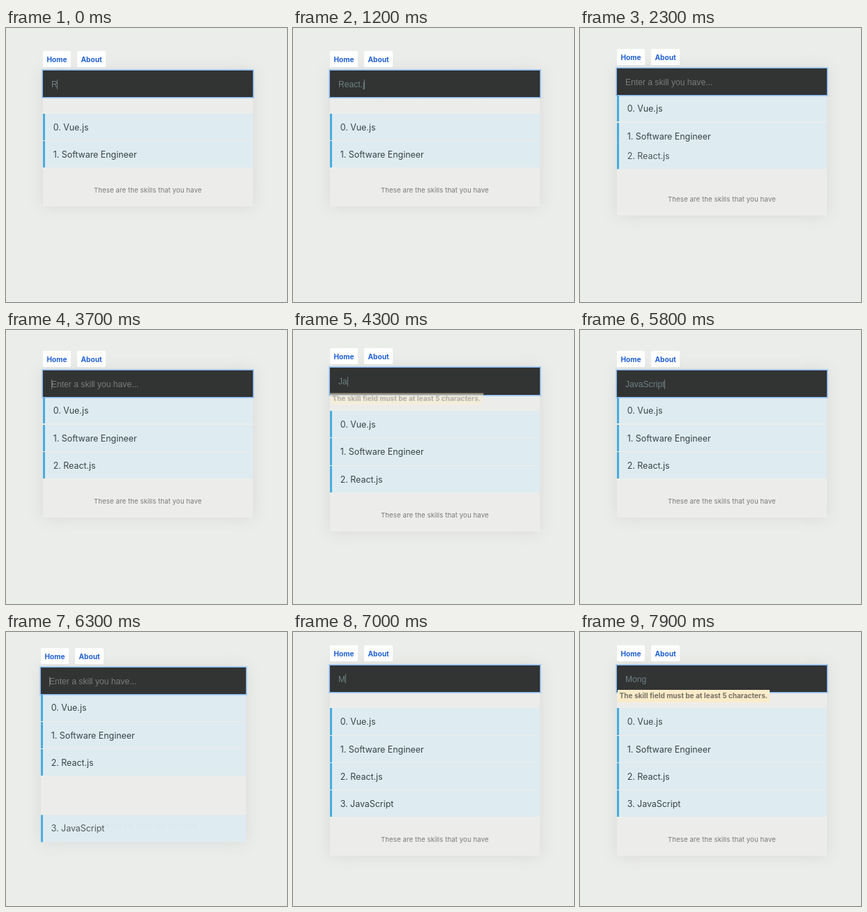
These frames come from a looping animation (403 px wide and 393 px high, 8 s). An HTML page:

```html
<!DOCTYPE html>
<html lang="en">
<head>
<meta charset="utf-8">
<title>Skills list</title>
<style>
  html, body { margin: 0; width: 100%; height: 100%; overflow: hidden; background: #ebedea; }
  body { position: relative; font-family: Inter, sans-serif; }
  body div, body span, svg { position: absolute; white-space: pre; }
  #page { top: 0; }
  .link {
    top: 0; height: 23px; line-height: 24.2px; border-radius: 1.5px; text-align: center;
    background: #fff; color: #1f5fd0; font-size: 10.1px; font-weight: 700;
  }
  #card { top: 28.3px; left: 0; width: 100%; background: #ecedeb; box-shadow: 0 0 21px #d8d9d7; }
  #field {
    top: 0; left: 0; width: 100%; height: 38.2px; z-index: 1; background: #323333;
    box-shadow: 0 0 0 1px #86b8f0, 0 0 0 2px rgba(134, 184, 240, .5);
  }
  #value { left: 11.9px; top: 0; line-height: 40.6px; font-family: "Liberation Sans", Arial, sans-serif; font-size: 12.13px; }
  #caret { top: 12.5px; width: 1px; height: 14px; background: #6c7979; }
  #alert {
    top: 35.5px; left: .5px; height: 17.5px; line-height: 17.5px; padding: 0 2.6px; z-index: 2;
    background: #faecca; color: #777064; font-size: 10.05px; font-weight: 700;
  }
  .row {
    left: 0; width: 100%; height: 38.2px; line-height: 39.6px; box-sizing: border-box;
    padding-left: 11.7px; border-left: 3px solid #46ade0;
    background: #deebf1; font-size: 12.4px;
  }
  #note { left: 0; width: 100%; line-height: 14px; text-align: center; font-size: 9.6px; letter-spacing: .1px; color: #787a78; }
  #pointer { left: 118px; top: 69px; }
</style>
</head>
<body>
<div id="page">
  <div id="card">
    <div id="note">These are the skills that you have</div>
    <div id="field"><span id="value"></span><div id="caret"></div></div>
    <div id="alert">The skill field must be at least 5 characters.</div>
  </div>
  <div class="link" style="left:0;width:40px">Home</div>
  <div class="link" style="left:49.3px;width:40.6px">About</div>
</div>
<svg id="pointer" width="13" height="21" viewBox="0 0 13 21" fill="none">
  <path id="beam" d="M3 2Q6.5 2 6.5 5V16Q6.5 19 3 19M10 2Q6.5 2 6.5 5M6.5 16Q6.5 19 10 19M5 13.5H8"
    style="paint-order:stroke" stroke="#eee" stroke-width="2.4"/>
  <path d="M3 2Q6.5 2 6.5 5V16Q6.5 19 3 19M10 2Q6.5 2 6.5 5M6.5 16Q6.5 19 10 19M5 13.5H8" stroke="#111"/>
</svg>
<script>
const LOOP = 8000, SCALE = 0.583, ROW = 39.3, ALERT_GAP = 23.5, FIELD = 38.2;
const SKILLS = ['Vue.js', 'Software Engineer', 'React.js', 'JavaScript'];
const ADDED = [-Infinity, -Infinity, 1698, 5885];

// Key press times per word; "done" is when the word is submitted
const WORDS = [
  { text: 'React.js', keys: [-30, 180, 340, 500, 640, 900, 1120, 1340], done: ADDED[2] },
  { text: 'JavaScript', keys: [3890, 4130, 4380, 4650, 4950, 5150, 5280, 5400, 5500, 5600], done: ADDED[3] },
  { text: 'Mong', keys: [6970, 7080, 7190, 7290], done: Infinity }
];
const LEAVE = 750;

const $ = id => document.getElementById(id);
const page = $('page'), card = $('card'), note = $('note'), value = $('value');
const caret = $('caret'), alertBox = $('alert'), pointer = $('pointer');

const rows = SKILLS.map((name, i) => {
  const el = document.createElement('div');
  el.className = 'row';
  el.textContent = `${i}. ${name}`;
  card.append(el);
  return el;
});

function bezier(x1, y1, x2, y2) {
  const at = (s, a, b) => 3 * (1 - s) ** 2 * s * a + 3 * (1 - s) * s * s * b + s ** 3;
  return x => {
    let lo = 0, hi = 1;
    for (let i = 0; i < 24; i++) {
      const mid = (lo + hi) / 2;
      if (at(mid, x1, x2) < x) lo = mid; else hi = mid;
    }
    return at(lo, y1, y2);
  };
}
const ease = bezier(.25, .1, .25, 1);
const easeIn = bezier(.42, 0, 1, 1);
const bounce = bezier(.215, .61, .355, 1);

// Stops are [position, value, easing towards the next stop]
function keyframes(stops, p) {
  if (p <= stops[0][0]) return stops[0][1];
  for (let i = 1; i < stops.length; i++) {
    const [a, from, fn] = stops[i - 1], [b, to] = stops[i];
    if (p < b) return from + (to - from) * fn((p - a) / (b - a));
  }
  return stops[stops.length - 1][1];
}

const FLIP_IN = {
  angle: [[0, 90, easeIn], [.4, -20, easeIn], [.6, 10, ease], [.8, -5, ease], [1, 0]],
  alpha: [[0, 0, easeIn], [.6, 1]]
};
const FLIP_OUT = {
  angle: [[0, 0, ease], [.3, -20, ease], [1, 90]],
  alpha: [[0, 1, ease], [.3, 1, ease], [1, 0]]
};
const RISE = {
  shift: [[0, 3000, bounce], [.6, -20, bounce], [.75, 10, bounce], [.9, -5, bounce], [1, 0]],
  alpha: [[0, 0, bounce], [.6, 1]]
};

// The alert shows from the first key and leaves at the fifth
function drawAlert(t) {
  const leaveAt = w => w.keys[4] ?? Infinity;
  const word = WORDS.find(w => t >= w.keys[0] && t < leaveAt(w) + LEAVE);
  alertBox.style.display = word ? '' : 'none';
  if (!word) return false;
  const out = leaveAt(word);
  const flip = t < out ? FLIP_IN : FLIP_OUT;
  const p = t < out ? (t - word.keys[0]) / 1000 : (t - out) / LEAVE;
  alertBox.style.opacity = keyframes(flip.alpha, p);
  alertBox.style.transform = `perspective(${400 * SCALE}px) rotateX(${keyframes(flip.angle, p)}deg)`;
  return true;
}

function drawField(t) {
  const word = WORDS.find(w => t >= w.keys[0] && t < w.done);
  const pressed = word ? word.keys.filter(k => k <= t) : [];
  const last = Math.max(...pressed, ...WORDS.map(w => w.done).filter(d => d <= t));
  value.textContent = word ? word.text.slice(0, pressed.length) : 'Enter a skill you have...';
  value.style.color = word ? '#6c8282' : '#7b7d7d';
  caret.style.left = 11.7 + (word ? value.getBoundingClientRect().width : 0) + 'px';
  caret.style.visibility = (t - last) % 1000 < 500 ? 'visible' : 'hidden';
}

function drawRows(t, top) {
  rows.forEach((el, i) => {
    const p = (t - ADDED[i]) / 1000;
    el.style.display = p < 0 ? 'none' : '';
    el.style.top = top + i * ROW + 'px';
    el.style.opacity = keyframes(RISE.alpha, p);
    el.style.color = p < 1 ? '#4a5558' : '#384346';
    el.style.transform = p < 1 ? `translateY(${keyframes(RISE.shift, p) * SCALE}px)` : 'none';
  });
}

function draw(t) {
  const count = ADDED.filter(a => a <= t).length;
  const alerting = drawAlert(t);
  const listTop = FIELD + (alerting ? ALERT_GAP : 0);
  const listEnd = listTop + count * ROW;

  // The page narrows while an incoming row overflows it
  const narrow = ADDED.some(a => t >= a && t < a + 500);
  page.style.left = (narrow ? 50 : 53) + 'px';
  page.style.width = (narrow ? 294 : 300.7) + 'px';
  page.style.top = 33 - 6.8 * (count - 2) + (alerting ? 0 : 3.6) + 'px';
  card.style.height = listEnd + 54.5 + 'px';
  note.style.top = listEnd + 24.8 + 'px';
  pointer.style.display = t < WORDS[0].done ? '' : 'none';

  drawField(t);
  drawRows(t, listTop);
}

function tick() {
  draw(performance.now() % LOOP);
  requestAnimationFrame(tick);
}
tick();
</script>
</body>
</html>
```
